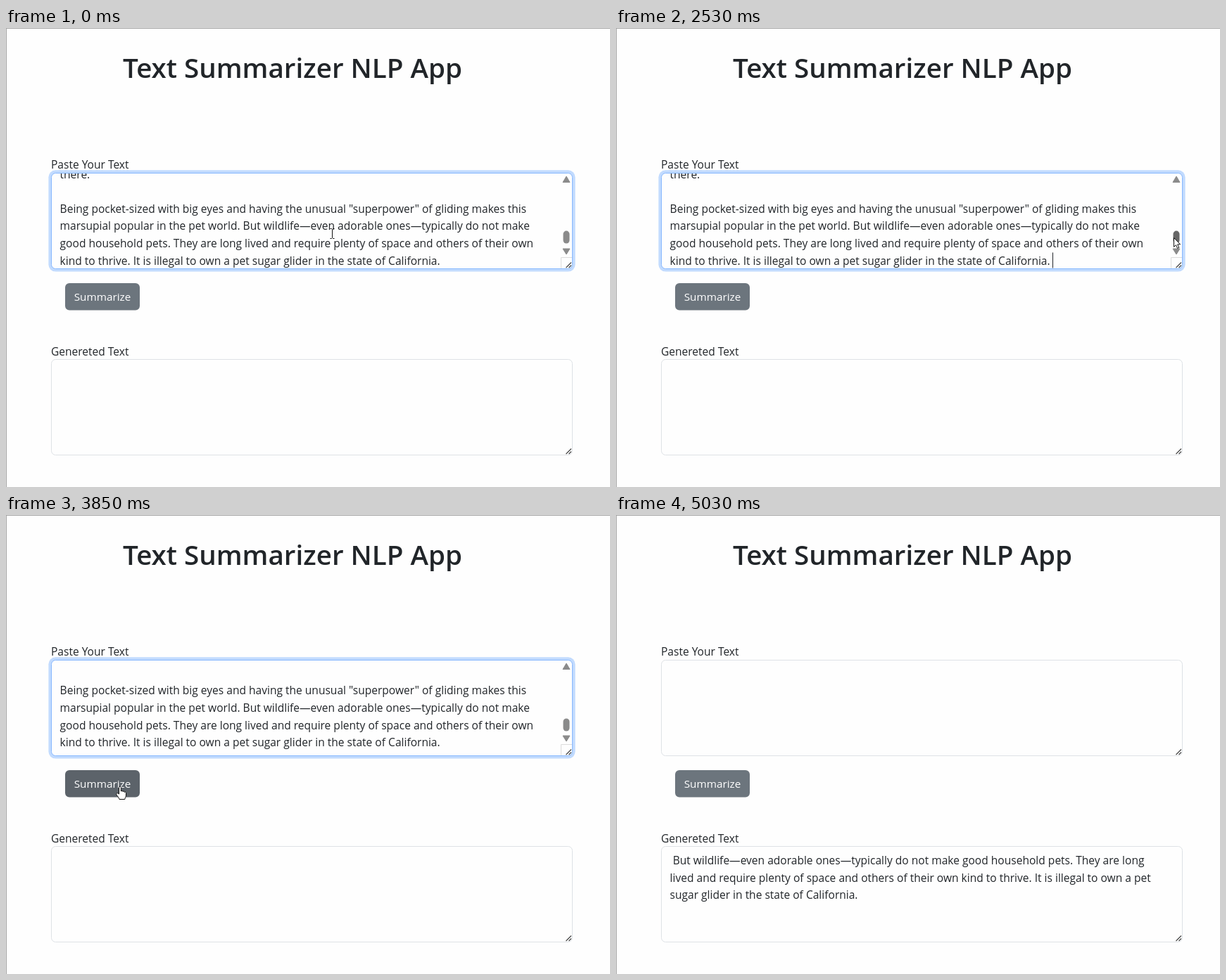
Animation, 858 px wide and 653 px high, one loop 6.04 s. Source, as an HTML page:

```html
<!DOCTYPE html>
<html lang="en">
<head>
<meta charset="utf-8">
<title>Text summarizer</title>
<style>
  html, body { margin: 0; width: 100%; height: 100%; overflow: hidden; background: #fefefe; }
  svg { display: block; width: 858px; height: 653px; }
  text { font: 15.55px "Open Sans", "Noto Sans", sans-serif; fill: #212529; white-space: pre; }
  .title { font-size: 38.6px; font-weight: 600; }
  .btn { font-size: 15.3px; fill: #fff; }
  .box { fill: #fefefe; stroke: #dee2e6; stroke-width: 1; }
  .grip { stroke: #444; stroke-width: 1.1; fill: none; }
  .tri { fill: #8b8b8b; }
  .ptr { fill: #fff; stroke: #111; stroke-width: 1; stroke-linejoin: round; }
</style>
</head>
<body>
<svg viewBox="0 0 858 653">
  <defs>
    <clipPath id="clip"><rect x="65" y="207" width="723" height="135"/></clipPath>
    <path id="grip" class="grip" d="M795.5 341L803 333.5M799.5 341L803 337.5"/>
  </defs>
  <rect width="858" height="653" fill="#fefefe"/>
  <path d="M0 .5H858M.5 0V653" stroke="#a6a6a6"/>

  <text class="title" x="166" y="71">Text Summarizer NLP App</text>
  <text x="64" y="200.3">Paste Your Text</text>
  <text x="64" y="466">Genereted Text</text>

  <rect id="ring" x="60.4" y="202.2" width="748.2" height="144.4" rx="10" fill="#c2dbfe"/>
  <rect id="input" class="box" x="64.5" y="206.5" width="740" height="136" rx="6"/>
  <g id="content">
    <g clip-path="url(#clip)">
      <g id="article">
        <rect id="caret" x="620" width="1" height="22" fill="#212529"/>
      </g>
    </g>
    <path class="tri" d="M791 219.5L796 211L801 219.5ZM791 314L796 322L801 314Z" stroke="#8b8b8b" stroke-linejoin="round"/>
    <rect id="thumb" x="791.5" width="9" height="18" rx="4.5"/>
    <path d="M788.5 342V326.5H804" fill="none" stroke="#dcdcdc"/>
  </g>
  <use href="#grip"/>

  <rect id="button" x="84" y="363" width="106" height="38.5" rx="6"/>
  <text class="btn" x="137" y="388.3" text-anchor="middle">Summarize</text>

  <rect class="box" x="64.5" y="471.5" width="740" height="136" rx="6"/>
  <g id="result"></g>
  <use href="#grip" y="265"/>

  <g id="pointer">
    <path id="arrow" class="ptr" d="M.5 .5V13.4L3.5 10.7L5.6 15.4L7.8 14.4L5.7 9.8H9.6Z"/>
    <path id="beam" d="M-3 -6.5H-1L0 -5.5L1 -6.5H3M0 -5.5V6.5M-3 7.5H-1L0 6.5L1 7.5H3" fill="none" stroke="#111"/>
    <path id="hand" class="ptr" d="M-1.5 11V1.5C-1.5 -.2 1.3 -.2 1.3 1.5V7C2 6 4 6.2 4 7.6C4.8 6.7 6.4 7 6.4 8.4C7.2 7.7 8.5 8 8.5 9.4V13C8.5 15 7 16 6.8 18.5H-1C-1.5 16 -4 14 -5.2 11.6C-5.6 10 -3.7 9.2 -2.6 10.2Z"/>
  </g>
</svg>
<script>
const LOOP = 6040, LINE = 24.6, TOP = 213.15;

const article = `Sugar gliders are squirrel-sized arboreal marsupials that inhabit the forests of Australia and New
Guinea. They are highly social, living in small colonies or family groups numbering up to seven
adults and their offspring. Sugar gliders are largely nocturnal and rarely come to the ground,
finding both shelter and food in the trees.

A thin fold of skin stretches from each wrist to the ankle on the same side of the body. When
the animal leaps from a branch and spreads its legs, the fold opens into a wide sail that lets it
travel a long way between trees. The tail is used as a rudder, and small changes in the curve of
each side help it to steer. Just before landing it swings its hind legs forward and grips the bark
with all four feet.

Their diet changes with the seasons. In warm months they eat mostly insects, and in the colder
part of the year they live on sap, gum, nectar and pollen. When food is hard to find they can
lower their body temperature and rest for many hours, which helps them to save energy until
the weather turns mild again.

Young are born very small and crawl at once into the pouch, where they stay for about two
months. After leaving the pouch they remain in the nest and ride on the back of a parent while
they learn to feed. The whole group sleeps together in a hollow lined with leaves, and every
member shares the same scent. Old trees with deep hollows are needed for a colony to settle
there.

Being pocket-sized with big eyes and having the unusual "superpower" of gliding makes this
marsupial popular in the pet world. But wildlife—even adorable ones—typically do not make
good household pets. They are long lived and require plenty of space and others of their own
kind to thrive. It is illegal to own a pet sugar glider in the state of California.`.split("\n");

const summary = [
  " But wildlife—even adorable ones—typically do not make good household pets. They are long",
  "lived and require plenty of space and others of their own kind to thrive. It is illegal to own a pet",
  "sugar glider in the state of California."
];

const END = article.length * LINE + 12.3 - 134.6;

// Each track: [start ms, value...]; a value holds until the next start.
const pointer = [
  [0, "beam", 464, 292], [130, "arrow", 346, 347], [250, "arrow", 277, 363],
  [400, "arrow", 278, 366], [520, "arrow", 277, 367], [670, "arrow", 369, 343],
  [830, "beam", 641, 323], [960, "arrow", 462, 352], [1090, "arrow", 240, 398],
  [1210, "arrow", 142, 420], [1340, "arrow", 139, 410], [1470, "arrow", 430, 362],
  [1600, "beam", 731, 312], [1850, "beam", 760, 310], [1980, "beam", 782, 308],
  [2130, "arrow", 789, 302], [2260, "arrow", 791, 300], [2390, "arrow", 792, 298],
  [2820, "arrow", 801, 168], [2950, "arrow", 800, 240], [3070, "arrow", 798, 345],
  [3190, "arrow", 795, 445], [3460, "arrow", 690, 438], [3590, "arrow", 420, 414],
  [3720, "arrow", 205, 392], [3850, "hand", 162, 386], [4110, "arrow", 161, 385],
  [4250, "hand", 162, 386], [4760, "arrow", 480, 525], [4880, "arrow", 765, 650],
  [5030, "none", 0, 0]
];
const scroll = [[0, END - 7.4], [2820, 0], [2950, END * .25], [3070, END * .7], [3190, END]];
const caret = [[0, 0], [400, 1], [960, 0], [1470, 1], [1980, 0], [2530, 1], [2820, 0]];
const thumb = [[0, "#8b8b8b"], [2260, "#666"], [3460, "#8b8b8b"]];
const button = [[0, "#6c757d"], [3850, "#5c636a"], [3980, "#565e64"], [4250, "#6c757d"]];
const focus = [[0, 1], [3980, .5], [4110, 0]];

const $ = id => document.getElementById(id);
const at = (track, t) => track.findLast(k => k[0] <= t).slice(1);
const set = (id, name, value) => $(id).setAttribute(name, value);

function addLines(id, lines, top) {
  lines.forEach((line, i) => {
    const el = document.createElementNS("http://www.w3.org/2000/svg", "text");
    el.setAttribute("x", 76.6);
    el.setAttribute("y", top + i * LINE + 18.4);
    el.textContent = line;
    $(id).append(el);
  });
}

function draw(t) {
  const [shape, x, y] = at(pointer, t);
  for (const id of ["arrow", "beam", "hand"]) set(id, "visibility", id === shape ? "visible" : "hidden");
  const half = shape === "beam" ? .5 : 0;
  set("pointer", "transform", `translate(${x - half} ${y})`);

  const [pos] = at(scroll, t);
  set("article", "transform", `translate(0 ${-pos})`);
  set("thumb", "y", 225.5 + 64 * pos / END);
  set("thumb", "fill", at(thumb, t)[0]);
  set("caret", "opacity", at(caret, t)[0]);
  set("button", "fill", at(button, t)[0]);

  const [lit] = at(focus, t);
  set("ring", "opacity", lit);
  $("input").style.stroke = lit ? "#86b7fe" : "#dee2e6";

  const done = t >= 4250;
  set("content", "visibility", done ? "hidden" : "visible");
  set("result", "visibility", done ? "visible" : "hidden");
}

addLines("article", article, TOP);
addLines("result", summary, 478.6);
set("caret", "y", TOP + (article.length - 1) * LINE + 1.2);

const start = performance.now();
function tick() {
  draw((performance.now() - start) % LOOP);
  requestAnimationFrame(tick);
}
tick();
</script>
</body>
</html>
```
